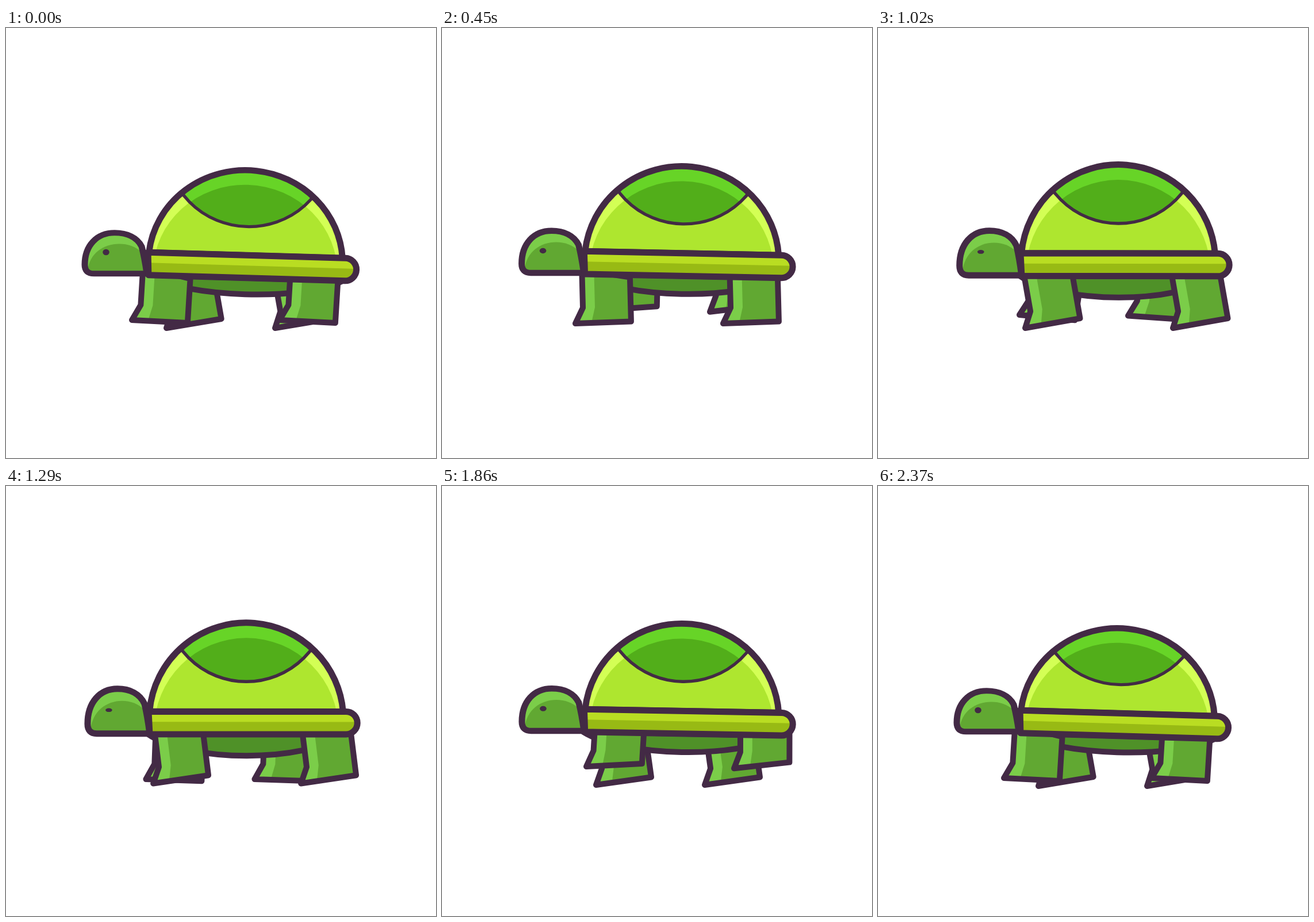
Write an HTML page with a canvas that moves like this. It is 748 px wide and 748 px high and loops after 2.4 s.

```html
<!DOCTYPE html>
<html lang="en">
<head>
<meta charset="utf-8">
<title>Walking turtle</title>
<style>
  html, body { margin: 0; width: 100%; height: 100%; overflow: hidden; background: #fff; }
  canvas { display: block; }
</style>
</head>
<body>
<canvas id="stage" width="748" height="748"></canvas>
<script>
const ctx = document.getElementById('stage').getContext('2d');
const LOOP = 2400, STEP = 30, CYCLE = LOOP - STEP;
const INK = '#432a45', SKIN = '#61a832', SKIN_LIGHT = '#7bcd49', BELLY = '#4f9128';

// Stride of one leg: time, toe x, toe y, foot angle, shin angle (degrees)
const STRIDE = [
  [0, 219, 508, 3, 3.5],
  [315, 226, 512, 0, 0.5],
  [450, 232, 514, -2, -1.5],
  [675, 245, 520, -8, -8],
  [915, 254, 522, -10, -10],
  [1020, 256, 522, -10, -10],
  [1185, 256, 522, -9.5, -10],
  [1500, 256, 505, -6, 0],
  [1635, 254, 491, -4, 1.5],
  [1860, 251, 488, -3, 3.5],
  [2100, 233, 491, 4, 10.5],
  [2205, 223, 499, 5.5, 9]
];

const rad = deg => deg * Math.PI / 180;

function keyAt(i) {
  const n = STRIDE.length, k = STRIDE[(i + n) % n];
  return [k[0] + Math.floor(i / n) * CYCLE, ...k.slice(1)];
}

// Smooth cyclic interpolation through the stride keys
function stride(time) {
  const t = time % CYCLE;
  let i = STRIDE.length - 1;
  while (STRIDE[i][0] > t) i--;
  const [a, b, c, d] = [-1, 0, 1, 2].map(o => keyAt(i + o));
  const span = c[0] - b[0], u = (t - b[0]) / span;
  return [1, 2, 3, 4].map(j => {
    const m0 = (c[j] - a[j]) / (c[0] - a[0]) * span;
    const m1 = (d[j] - b[j]) / (d[0] - b[0]) * span;
    const u2 = u * u, u3 = u2 * u;
    return (2 * u3 - 3 * u2 + 1) * b[j] + (u3 - 2 * u2 + u) * m0
      + (3 * u2 - 2 * u3) * c[j] + (u3 - u2) * m1;
  });
}

function polygon(points) {
  const path = new Path2D();
  points.forEach(([x, y]) => path.lineTo(x, y));
  path.closePath();
  return path;
}

function fill(path, color) {
  ctx.fillStyle = color;
  ctx.fill(path);
}

function outline(path, width = 10) {
  ctx.strokeStyle = INK;
  ctx.lineWidth = width;
  ctx.stroke(path);
}

function circle(x, y, r) {
  const path = new Path2D();
  path.arc(x, y, r, 0, Math.PI * 2);
  return path;
}

function group(draw) {
  ctx.save();
  draw();
  ctx.restore();
}

function leg(time, shift, isBack) {
  let [x, y, foot, shin] = stride(time);
  const lift = isBack ? Math.max(0, (508 - y) / 18) : 0;
  x += shift;
  y += 3 * lift;
  foot = rad(foot - 3 * lift);
  shin = rad(shin - 3 * lift);
  const local = (px, py) => [
    x + px * Math.cos(foot) - py * Math.sin(foot),
    y + px * Math.sin(foot) + py * Math.cos(foot)
  ];
  const up = ([px, py], len) => [px + len * Math.sin(shin), py - len * Math.cos(shin)];
  const toe = [x, y], ankle = local(14, -27), heel = local(97, 0);
  const shape = polygon([toe, ankle, up(ankle, 66), up(heel, 77), heel]);
  const inner = local(35, -27);
  const light = polygon([toe, ankle, up(ankle, 66), up(inner, 66), inner, local(28, 0)]);
  fill(shape, SKIN);
  group(() => { ctx.clip(shape); fill(light, SKIN_LIGHT); });
  outline(shape);
}

function belly(depth) {
  const y = 432 + depth / 0.75;
  const path = new Path2D(`M247 432C318 ${y} 520 ${y} 588 432Z`);
  fill(path, BELLY);
  outline(path);
}

function head(p) {
  const shape = new Path2D('M250 431H158Q142 431 142 414C142 377 163 353 194 353C216 353 233 362 241 379Q246 400 250 431Z');
  const shade = new Path2D('M147 440V425C150 392 175 374 202 374C217 374 230 379 241 390L255 440Z');
  const squash = 1 - 0.09 * p;
  ctx.translate(0, 437);
  ctx.scale(1, squash);
  ctx.translate(0, -437);
  fill(shape, SKIN_LIGHT);
  group(() => { ctx.clip(shape); fill(shade, SKIN); });
  outline(shape, 11);
  const eye = new Path2D();
  eye.ellipse(179, 390, 5.8, (3.3 + 2 * p) / squash, 0, 0, Math.PI * 2);
  fill(eye, INK);
}

function dome() {
  const shell = new Path2D();
  const start = Math.asin(14.5 / 169);
  shell.arc(418, 407, 169, Math.PI + start, -start);
  shell.closePath();
  const shade = circle(418, 425, 160.5), scute = circle(418, 198.5, 142);
  group(() => {
    ctx.clip(shell);
    fill(shell, '#d3ff55');
    fill(shade, '#aee62f');
    group(() => {
      ctx.clip(scute);
      fill(scute, '#67d427');
      fill(shade, '#52ae1a');
    });
    outline(scute, 5.5);
  });
  outline(shell, 11);
}

function belt() {
  const rim = new Path2D('M248 392.5H591.5A19.75 19.75 0 0 1 591.5 432H250Z');
  fill(rim, '#b9dd22');
  group(() => {
    ctx.clip(rim);
    fill(polygon([[240, 410.5], [620, 410.5], [620, 440], [240, 440]]), '#98ba14');
  });
  outline(rim, 11);
}

function draw(time) {
  const p = (1 + Math.cos(2 * Math.PI * time / CYCLE)) / 2;
  const dy = 11.7 * p * p - 9 * p;
  const half = CYCLE / 2;
  const inBody = paint => group(() => {
    ctx.translate(418 - 1.6 * p, 412 + dy);
    ctx.rotate(rad(1.7 * p));
    ctx.translate(-418, -412);
    paint();
  });

  ctx.fillStyle = '#fff';
  ctx.fillRect(0, 0, 748, 748);
  ctx.lineJoin = ctx.lineCap = 'round';

  leg(time + half, 23, false);
  leg(time + half, 212, true);
  inBody(() => belly(37.5 - 9 * p));
  leg(time, 0, false);
  leg(time, 257, true);
  group(() => {
    ctx.translate(-5 * p, dy - 6.9 * p);
    head(p);
  });
  inBody(() => {
    group(() => {
      ctx.translate(0, 392.5);
      ctx.scale(1, 1 - 0.043 * p * p);
      ctx.translate(0, -392.5);
      dome();
    });
    belt();
  });
}

function tick() {
  draw(Math.floor(performance.now() % LOOP / STEP) * STEP);
  requestAnimationFrame(tick);
}
tick();
</script>
</body>
</html>
```
